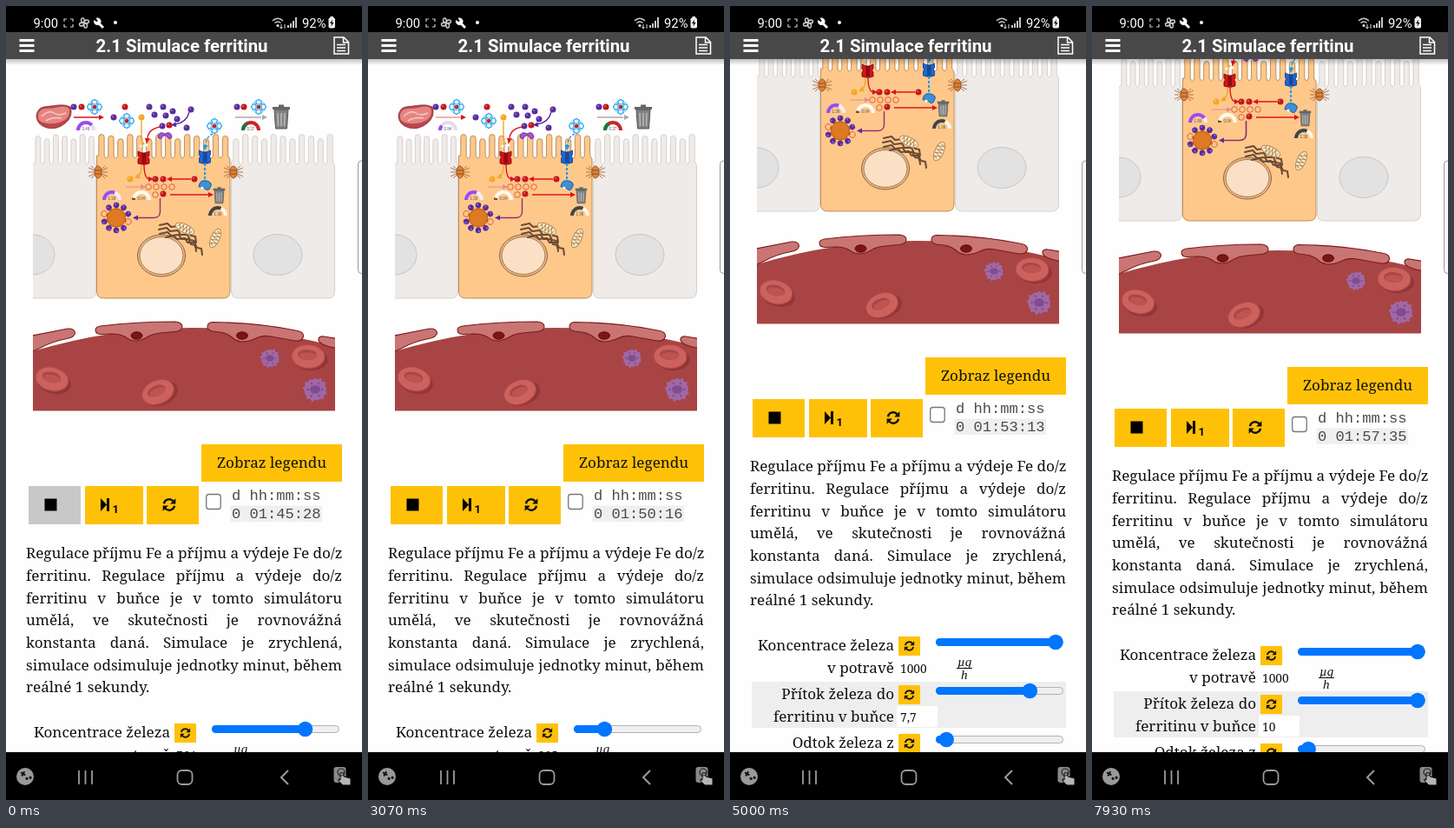
These frames come from a looping animation (410x913 px, 8000 ms). An HTML page:

```html
<!DOCTYPE html>
<html lang="cs">
<head>
<meta charset="utf-8">
<title>Simulace ferritinu</title>
<style>
html, body { margin: 0; width: 100%; height: 100%; overflow: hidden; background: #fff; }
#stage { position: relative; width: 410px; height: 913px; overflow: hidden; background: #fefefe; }
#page, #page svg, #chrome { position: absolute; left: 0; top: 0; }
#page { width: 410px; height: 1040px; will-change: transform; }
svg { display: block; }
text, p { font-family: "Noto Serif", serif; font-size: 17.1px; fill: #111; color: #111; }
#page p { position: absolute; left: 23px; top: 616.3px; width: 364px; margin: 0; line-height: 25.65px; }
p span { display: block; white-space: nowrap; text-align: justify; text-align-last: justify; }
p span:last-child { text-align-last: left; }
.mono { font-family: "Liberation Mono", monospace; fill: #4a4a4a; white-space: pre; }
.ui { font-family: Roboto, sans-serif; fill: #fff; }
.small { font-size: 13.7px; }
.math { font: italic 15px "Liberation Serif", serif; }
.tiny { font: 4.5px "Liberation Sans", sans-serif; fill: #555; text-anchor: middle; }
.end { text-anchor: end; }
</style>
</head>
<body>
<div id="stage">
  <div id="page">
    <svg id="scene" width="410" height="1040"></svg>
    <p><span>Regulace příjmu Fe a příjmu a výdeje Fe do/z</span><span>ferritinu. Regulace příjmu a výdeje do/z</span><span>ferritinu v buňce je v tomto simulátoru</span><span>umělá, ve skutečnosti je rovnovážná</span><span>konstanta daná. Simulace je zrychlená,</span><span>simulace odsimuluje jednotky minut, během</span><span>reálné 1 sekundy.</span></p>
  </div>
  <svg id="chrome" width="410" height="913">
    <defs><linearGradient id="shade" x2="0" y2="1"><stop stop-color="#000" stop-opacity=".25"/><stop offset="1" stop-color="#000" stop-opacity="0"/></linearGradient></defs>
    <rect y="61" width="410" height="7" fill="url(#shade)"/>
    <rect width="410" height="30"/>
    <rect y="30" width="410" height="31" fill="#484848"/>
    <rect x="405.5" y="178" width="10" height="129.500" rx="4" fill="#fafafa" stroke="#999"/>
    <text class="ui" x="31.500" y="24.500" style="font-size:14.800px">9:00</text>
    <g fill="none" stroke="#ccc" stroke-width="1.200">
      <path d="M70 15H67V18M74 15H77V18M67 21V24H70M77 21V24H74"/>
      <rect id="blink" x="70" y="17.500" width="4" height="4"/>
      <path d="M90 19.500q-5-1-3-5q4-2 3 5q1-5 5-3q2 4-5 3q5 1 3 5q-4 2-3-5q-1 5-5 3q-2-4 5-3" stroke-width="1.500"/>
      <path d="M105.500 18.500L112 25" stroke="#fff" stroke-width="2.800"/>
      <path d="M104 14a4 4 0 1 1-2.500 2.500l3 2 1.500-1.500Z" fill="#fff" stroke="#fff" stroke-width=".6"/>
      <path d="M307 17q6-5.500 12 0M309.500 19.500q3.500-3 7 0" stroke-width="1.600"/>
    </g>
    <circle cx="126" cy="19" r="2" fill="#fff"/><circle cx="313" cy="22.500" r="1.600" fill="#ddd"/>
    <path d="M317 21v5m-1.500-2l1.500 2 1.500-2M321 26v-5" stroke="#ddd" fill="none"/>
    <path d="M325 25v-3M328 25v-5M331 25v-8M334 25V13" stroke="#ddd" stroke-width="1.800"/>
    <text class="ui" x="341" y="24.500" style="font-size:14.800px">92%</text>
    <rect x="371.500" y="13.500" width="7.500" height="12" rx="1.800" fill="#eee"/><rect x="373.500" y="12" width="3.500" height="2" fill="#eee"/>
    <path d="M376 15.500l-3 4.500h2l-.5 3.500 3-4.500h-2z"/>
    <path d="M15.500 39.500h17M15.500 45.500h17M15.500 51.500h17" stroke="#fff" stroke-width="3"/>
    <text class="ui" x="103.500" y="52.500" style="font-size:20.400px;font-weight:700">2.1 Simulace ferritinu</text>
    <path d="M378 36h11l5.500 5.500V55H378zM388.500 36v6h6M381 44.500h10M381 48h10M381 51.500h10" fill="none" stroke="#fff" stroke-width="1.500"/>
    <rect y="858" width="410" height="55"/>
    <g fill="none" stroke="#9a9a9a" stroke-width="1.800">
      <path d="M84 879v16M91.500 879v16M99 879v16"/>
      <rect x="197.500" y="879" width="17" height="16" rx="5"/>
      <path d="M325 879l-8 8 8 8" stroke-width="2"/>
      <rect x="377.500" y="875" width="14" height="18" rx="3" fill="#8a8a8a" stroke="none"/>
      <path d="M385 882v8l-2-1v2l5 5h9v-8l-8-2v-4z" fill="#b5b5b5" stroke="#000" stroke-width="1"/>
      <circle cx="386" cy="881" r="4" stroke="#222" stroke-width="1.200"/>
    </g>
    <circle cx="22" cy="886" r="10" fill="#999"/>
    <g stroke="#111" stroke-width="2" fill="#111" transform="rotate(30 22 886)"><path d="M15.500 884.500h6M18.500 881.500v6"/><circle cx="25" cy="887" r=".6"/><circle cx="28" cy="884" r=".6"/></g>
  </svg>
</div>
<script>
const LOOP = 8000;
const PURPLE = '#5a2ca0', RED = '#c4161c', BLUE = '#1e9bea', ORANGE = '#f5a623', YELLOW = '#ffc107';
const $ = id => document.getElementById(id);
const dot = (x, y, c, r = 3.5) => `<circle cx="${x}" cy="${y}" r="${r}" fill="${c}"/><circle cx="${x - r * .3}" cy="${y - r * .3}" r="${r * .3}" fill="#fff" opacity=".35"/>`;
const dots = (c, list) => list.map(([x, y]) => dot(x, y, c)).join('');
const ring = (x, y) => `<circle cx="${x}" cy="${y}" r="3.3" fill="none" stroke="#d9442f" stroke-width=".8"/>`;
const line = (d, c, w = 1.4, extra = '') => `<path d="${d}" fill="none" stroke="${c}" stroke-width="${w}" ${extra}/>`;
const head = (x, y, deg, c) => `<path d="M0 0L-6-3V3Z" fill="${c}" transform="translate(${x} ${y}) rotate(${deg})"/>`;
const ellipse = (x, y, rx, ry, fill, stroke = 'none', deg = 0) =>
  `<ellipse rx="${rx}" ry="${ry}" fill="${fill}" stroke="${stroke}" transform="translate(${x} ${y}) rotate(${deg})"/>`;
const text = (x, y, s, cls = '', id = '') => `<text x="${x}" y="${y}" class="${cls}" id="${id}">${s}</text>`;
const box = (x, y, w, h, c, id = '') => `<rect x="${x}" y="${y}" width="${w}" height="${h}" fill="${c}" id="${id}"/>`;
const turns = (n, draw) => Array.from({ length: n }, (_, i) => `<g transform="rotate(${i * 360 / n})">${draw(i)}</g>`).join('');
const at = (x, y, s, body, deg = 0) => `<g transform="translate(${x} ${y}) rotate(${deg}) scale(${s})">${body}</g>`;

const heme = (x, y) => at(x, y, 1, turns(4, () =>
  '<path d="M-2-3L-3.500-6.500 0-8.500 3.500-6.500 2-3Z" fill="#e9f6ff" stroke="#28a4e8" stroke-width="1.200"/><path d="M3-3L5.500-5.500" stroke="#28a4e8"/>') + dot(0, 0, RED, 2.3));

const trash = (x, y, s) => at(x, y, s,
  '<path d="M-8-9H8L6.500 13H-6.500Z" fill="#808080" stroke="#555"/><path d="M-10-10.500H10M-3-13H3" stroke="#666" stroke-width="3"/><path d="M-4-5L-3.500 10M0-5V10M4-5L3.500 10" stroke="#bbb" stroke-width="1.500"/>');

const arc = (x, y, c, part, id = '') =>
  `<path id="${id}" d="M${x - 9} ${y}a9 9 0 0 1 18 0" pathLength="100" fill="none" stroke="${c}" stroke-width="4" stroke-dasharray="${part} 200"/>`;
const gauge = (x, y, base, c, part, label, id = '') =>
  arc(x, y, base, 100) + arc(x, y, c, part, id) + text(x, y, label, 'tiny', id && id + 'Label');

function cell(x0, x1, n, floor, fill, stroke) {
  const step = (x1 - x0) / n, w = step * .29, gap = step - 2 * w;
  let d = `M${x0} 326V${floor}`;
  for (let i = 0; i < n; i++) {
    const left = x0 + step * i + gap / 2, top = 153 + 3 * Math.sin(i * 2.1 + x0);
    d += `L${left} ${floor}V${top}a${w} ${w} 0 0 1 ${2 * w} 0V${floor}` + (i < n - 1 ? `q${gap / 2} 6 ${gap} 0` : '');
  }
  return `<path d="${d}L${x1} ${floor + 4}V328q0 8-8 8H${x0 + 8}q-8 0-8-8Z" fill="${fill}" stroke="${stroke}" stroke-width=".9"/>`;
}

const junction = x => at(x, 191, 1, line('M-11-5L11 5M-11 5L11-5M-11 0H11M-8-7L8 7M-8 7L8-7', '#a05a2c', .8)
  + ellipse(0, 0, 4, 7, '#df8435', '#a05a2c') + line('M-4-2H4M-4 2H4', '#8f4a20', 1));

const channel = (x, y, c, dark) => at(x, y, 1,
  `<path d="M-6.500-7q6.500 4 13 0v5l-1.500 2 1.500 2v5q-6.500 3-13 0V2L-5 0l-1.500-2Z" fill="${c}" stroke="${dark}" stroke-width=".8"/><path d="M-2-5h4.500V7H-2Z" fill="${dark}" opacity=".7"/>`);

const mito = (x, y, deg) => at(x, y, 1, ellipse(0, 0, 11.5, 5, '#fff0d4', '#b28a58')
  + line('M-9 1l2-4 2 7 2-8 2 8 2-8 2 8 2-8 2 7 2-4', '#b28a58', 1), deg);

const redCell = (x, y, deg) => at(x, y, 1, ellipse(3, 3, 20, 13, '#933636') + ellipse(0, 0, 19, 13.500, '#cc615e', '#b14b49')
  + ellipse(-1, -2, 11, 6, '#a94745') + ellipse(0, -.5, 10, 4.300, '#bc5552'), deg);

const platelet = (x, y, r) => at(x, y, r, turns(13, i => `<path d="M-.22-.7L0-${i % 3 ? 1 : .88} .22-.7Z" fill="#a168a6"/>`)
  + ellipse(0, 0, .84, .8, '#a168a6') + turns(6, i => ellipse(.55, 0, .1, .08, '#80508c')) + ellipse(0, 0, .4, .32, '#7f4d8f'));

const bloodCell = d => `<path d="${d}" fill="#c97573" stroke="#7b1b1b" stroke-width="1.100"/>`;

// Stacked, stepped folds that run down past the nucleus.
const folds = [[177, 252], [176, 257], [177, 262], [184, 266]].map(([x, y]) =>
  line(`M${x} ${y}l9-2 4 4 9-1 3 5 8 0 3 6 5 1 1 7`, '#6b4a35', 2, 'stroke-linejoin="round" stroke-linecap="round"')).join('');

const sync = (x, y, s) => at(x, y, s, turns(2, () =>
  line('M-5.800-1.200A5.900 5.900 0 0 1 4.500-3.800', '#111', 2.200) + '<path d="M7-7V-1H1Z" fill="#111"/>'));

const slider = (id, y) => `<rect x="237.500" y="${y - 4}" width="146" height="8" rx="4" fill="#efefef" stroke="#b2b2b2"/>`
  + `<rect id="${id}Fill" x="237" y="${y - 4.5}" width="20" height="9" rx="4.500" fill="#0075ff"/><circle id="${id}Thumb" cy="${y}" r="8.700" fill="#0075ff"/>`;

const lumen = 'M31 397Q200 346 379 391V466H31Z';

const picture = `<clipPath id="frame"><rect x="31" y="95" width="348" height="370.600"/></clipPath><g clip-path="url(#frame)">`
  + cell(-40, 103.5, 14, 179, '#efebe8', '#d2cdc9') + cell(259.5, 378.5, 11, 179, '#efebe8', '#d2cdc9')
  + cell(104.5, 258, 14, 172, '#fec88b', '#b88550')
  + ellipse(31, 286, 25, 23, '#e3e2e2', '#c6c6c6') + ellipse(313, 286, 28, 23.5, '#e3e2e2', '#c6c6c6')
  + ellipse(179, 287, 27.5, 24, '#e9b988', '#8d633e') + ellipse(179, 287, 25, 21.5, '#fce0c5', '#a4784f')
  + junction(106) + junction(262) + folds
  + mito(206, 256, 25) + mito(241, 267, -66)
  // lumen of the gut
  + `<path d="M35 127q1-10 9-11t16-2 14 2q4 11-6 19t-21 5-12-13Z" fill="#b9474b" stroke="#8a2a2f" stroke-width=".8"/><path d="M37 126q1-8 9-8t16-2 11 3q1 9-7 13t-19 3-10-9Z" fill="#e58583"/>`
  + line('M41 127q8-8 14-4t14 0M46 132q8-5 18-3', '#f7cbc5', 1.500)
  + '<path id="intake" d="M78 128H107" stroke="#d9121a"/>' + head(113, 128, 0, '#d9121a')
  + line('M264 128H294', '#aaa') + head(301, 128, 0, '#aaa')
  + dots(PURPLE, [[78, 116], [124, 128], [165, 116], [171, 125], [181, 116], [184, 126], [192, 121], [213, 119], [208, 140], [197, 130], [180, 138], [266, 116]])
  + dots(RED, [[87, 116], [137, 116], [188, 137], [274, 116]]) + dot(156, 128, ORANGE)
  + heme(102, 116) + heme(139, 132) + heme(240, 138) + heme(291, 116) + trash(317, 128, 1)
  + line('M211 122Q208 134 195 136', PURPLE) + head(190, 137, 172, PURPLE)
  + line('M178 139Q164 141 163 152', '#e0131a') + head(162, 158, 98, '#e0131a')
  + line('M156 132V154', ORANGE) + line('M238 147Q231 150 229.500 160', BLUE, 1.500, 'stroke-dasharray="3 2"') + head(229, 166, 95, BLUE)
  + '<path d="M175 151q1-8 8-4 7-4 8 4-4 4-5-1-3-2-6 0-1 5-5 1" fill="#a553d4" stroke="#7430a0"/>'
  + dot(155, 161, '#fff', 1.5) + dot(158, 158, ORANGE, 1.5) + dot(162, 160, '#fff', 1.5)
  + channel(158.5, 174, '#d8131a', '#6d0a0f') + channel(229, 173, '#1f67d1', '#123c87')
  + gauge(92, 143, '#e2dcec', '#9a4cf0', 76, '3.49', 'diet') + gauge(282, 143, '#c8262c', '#157a3a', 32, '0.37')
  // inside the cell
  + line('M156 182Q157 194 150 197', ORANGE) + head(148, 198, 155, ORANGE)
  + line('M159 182Q159 198 165 199', '#e0131a') + head(170, 199, 0, '#e0131a')
  + line('M213 199H190', '#e0131a') + head(185, 199, 180, '#e0131a')
  + line('M229 181V200', BLUE, 2, 'stroke-dasharray="3 2"')
  + '<path d="M222 208q1-9 9-7t4 8q-2 5-6 1-2-3-7-2Z" fill="#3d8fd6" stroke="#1b5c9c"/>' + dot(226, 209, '#fff', 1.5)
  + line('M138 208H155', '#e58d8d', 1) + head(161, 208, 0, '#e58d8d')
  + dot(143, 199, ORANGE) + dots(RED, [[172, 199], [181, 199], [217, 199], [181, 216]])
  + [164, 173, 182, 191].map(x => ring(x, 208)).join('') + ring(172, 217)
  + line('M189 217H233', '#e0131a') + head(239, 217, 0, '#e0131a') + trash(245.5, 218, .68)
  + '<path id="store" d="M177.500 221V237Q177 243.500 170 243.500H152" fill="none" stroke="#94306a"/>' + head(146, 243.500, 180, PURPLE)
  + gauge(122, 223, '#f4eef8', '#9a4cf0', 62, '1.38', 'inflow') + gauge(156, 223, '#fffaf2', '#7c4a2c', 8, '0.04') + gauge(244, 241, '#fff6ea', '#444', 63, '1.36')
  + at(127, 243.5, 1, turns(10, () => '<path d="M-4-8L0-13 4-8Z" fill="#d9731e"/>') + ellipse(0, 0, 10.5, 10.5, '#dd7a22', '#bd5b12')
    + turns(10, i => i % 5 === 3 ? ring(0, -14.500) : dot(0, -14.500, PURPLE, 3.300)))
  // blood vessel
  + `<path d="${lumen}" fill="#a84444"/>`
  + bloodCell('M25 380L71 371Q79 370.500 79.500 376Q79 381 70 382.500Q52 386 40 393L25 400Z')
  + bloodCell('M109 368Q150 363 195 363Q203 364 203 368.500Q203 374 194 374.500L178 376Q168 377 162 381Q155 385 150 385Q143 385 138 381Q132 377 122 377L109 377.500Q103 377 103 372.500Q103 369 109 368Z')
  + bloodCell('M238 363.500Q290 364 336 373.500Q343 375 342.500 380Q341 386 333 385L305 380Q295 378 288 382Q280 386 271 386Q264 385 259 380Q254 376 246 375L238 374Q232 373 232 369Q232 364 238 363.500Z')
  + bloodCell('M366 380L390 384V398L378 393Q368 391 363 388Q358 384 361 381Q363 379.500 366 380Z')
  + ellipse(150.5, 379, 6.500, 4.200, '#7d1414', '#5a0b0b') + ellipse(272, 379, 6.500, 4.200, '#7d1414', '#5a0b0b')
  + redCell(53, 429, 14) + redCell(175, 444, -22) + redCell(348, 403, 3) + platelet(304, 405, 12) + platelet(356, 441, 15) + '</g>';

const controls = box(225, 504, 162, 43, YELLOW) + text(243, 531, 'Zobraz legendu')
  + box(26, 552, 60, 44, YELLOW, 'stop') + box(91, 552, 67, 44, YELLOW) + box(162, 552, 60, 44, YELLOW)
  + box(44.5, 566.5, 14, 14, '#000') + '<path d="M109 566L116 573.500 109 581ZM116 566h3v15h-3Z"/>'
  + '<text class="ui" x="122.500" y="582.500" style="font-size:13px;font-weight:700;fill:#000">1</text>' + sync(188, 573.5, 1.05)
  + '<rect x="230.700" y="561.500" width="16.500" height="17" rx="3" fill="#fff" stroke="#777" stroke-width="1.300"/>'
  + box(258.5, 574.5, 105.5, 18.5, '#efefef') + text(260, 567.5, 'd hh:mm:ss', 'mono') + text(260, 589, '', 'mono', 'clock')
  + box(25, 877, 362, 53, '#eee') + box(192, 905, 47, 24, '#fff')
  + [825, 881, 937].map(y => box(194, y, 25, 22, YELLOW) + sync(206.500, y + 11, .8)).join('')
  + [[841, 'Koncentrace železa'], [866.5, 'v potravě'], [896.5, 'Přítok železa do'], [922.5, 'ferritinu v buňce'], [953, 'Odtok železa z']].map(([y, s]) => text(189, y, s, 'end')).join('')
  + text(196, 866.5, '', 'small', 'dietValue') + text(196, 922.5, '', 'small', 'inflowValue')
  + text(262, 858.5, 'µg', 'math') + text(266, 873.5, 'h', 'math') + box(261, 861, 18, 1, '#111')
  + slider('dietSlider', 831.5) + slider('inflowSlider', 887.5) + slider('outflowSlider', 943.5);

$('scene').innerHTML = picture + controls;

// Piecewise linear motion through [time, value] points.
function track(points, t) {
  const i = points.findIndex(p => p[0] > t);
  if (i < 0) return points[points.length - 1][1];
  if (i === 0) return points[0][1];
  const [a, b] = [points[i - 1], points[i]];
  return a[1] + (b[1] - a[1]) * (t - a[0]) / (b[0] - a[0]);
}
const SCROLL = [[4600, 0], [4670, 6.5], [4740, 27], [4800, 48], [4870, 73], [4930, 90], [5000, 100], [5270, 102], [5400, 103], [7800, 103], [7870, 98], [7930, 89]];
const SECONDS = [[0, 6328], [1130, 6436], [3070, 6616], [4670, 6778], [5000, 6793], [5470, 6821], [7930, 7055], [8000, 7061]];
const DIET = [[1900, 764], [2500, 205], [3100, 205], [3450, 1000]];
const INFLOW = [[7050, 7.7], [7500, 10]];

function setSlider(id, part) {
  const x = 246 + 129 * part;
  $(id + 'Thumb').setAttribute('cx', x);
  $(id + 'Fill').setAttribute('width', x - 237);
}
const pad = n => String(n).padStart(2, '0');

function draw(t) {
  const diet = Math.round(track(DIET, t)), inflow = Math.round(track(INFLOW, t) * 10) / 10;
  const s = Math.floor(track(SECONDS, t) + .01);
  $('page').style.transform = `translateY(${-track(SCROLL, t)}px)`;
  $('clock').textContent = `0 ${pad(Math.floor(s / 3600))}:${pad(Math.floor(s / 60) % 60)}:${pad(s % 60)}`;
  $('stop').setAttribute('fill', t < 1900 ? '#c8c8c8' : YELLOW);
  $('blink').style.opacity = t % 1000 > 400 && t % 1000 < 900 ? 1 : 0;
  setSlider('dietSlider', diet / 1000);
  setSlider('inflowSlider', inflow / 10);
  $('dietValue').textContent = diet;
  $('inflowValue').textContent = String(inflow).replace('.', ',');
  $('diet').setAttribute('stroke-dasharray', `${diet / 10} 200`);
  $('dietLabel').textContent = (diet * .00457).toFixed(2);
  $('intake').setAttribute('stroke-width', .4 + diet * .0012);
  $('inflow').setAttribute('stroke-dasharray', `${inflow * 8} 200`);
  $('inflowLabel').textContent = (inflow * .18).toFixed(2);
  $('store').setAttribute('stroke-width', .5 + inflow * .12);
}

setSlider('outflowSlider', .025);
draw(0);
let start;
function tick(now) {
  start ??= now;
  draw((now - start) % LOOP);
  requestAnimationFrame(tick);
}
requestAnimationFrame(tick);
</script>
</body>
</html>
```
